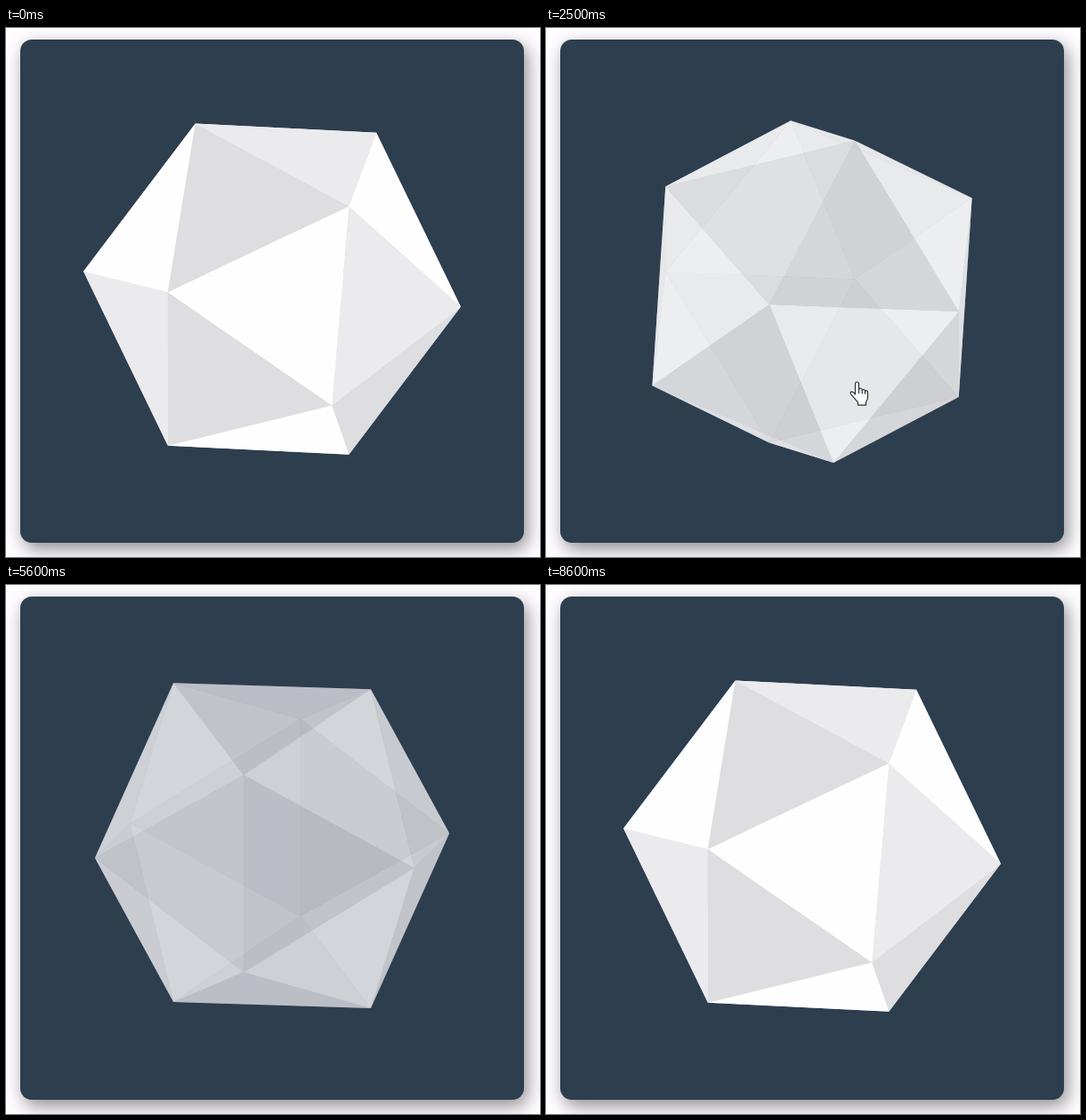
An HTML page with a canvas for the animation above (9.1 s loop, 600 px wide and 595 px high).

```html
<!DOCTYPE html>
<html lang="en">
<head>
<meta charset="utf-8">
<title>Icosahedron</title>
<style>
  html, body { margin: 0; width: 100%; height: 100%; overflow: hidden; background: #fffdff; }
  .card {
    position: absolute; left: 16px; top: 13px; width: 566px; height: 565.5px;
    border-radius: 13px; background: #2d3e4f;
    box-shadow: 4px 7px 20px rgba(0, 0, 0, .45);
  }
  canvas { position: absolute; left: 0; top: 0; }
</style>
</head>
<body>
<div class="card"></div>
<canvas id="stage" width="600" height="595"></canvas>
<script>
const ctx = document.getElementById('stage').getContext('2d');
const LOOP = 9100, STEP = 100, TURN = 3000, ENTER = 880, LEAVE = 4995;
const PHI = (1 + Math.sqrt(5)) / 2, UNIT = 112.6;
const WHITE = '#fffeff', LIGHT = '#ebeaec', DARK = '#dedddf';

// Puts a point into the frame whose first axis is k (cyclic order).
const place = (k, p) => [0, 1, 2].map(i => p[(i - k + 3) % 3]);

const faces = [];
for (const a of [-1, 1]) for (const b of [-1, 1]) {
  for (const c of [-1, 1]) {
    faces.push({ color: WHITE, points: [[0, a, b * PHI], [c, a * PHI, 0], [c * PHI, 0, b]] });
  }
  // Two faces meet at each short edge, one on each side of it.
  for (let k = 0; k < 3; k++) {
    faces.push({
      color: b > 0 ? DARK : LIGHT,
      points: [[a * PHI, 0, 1], [a * PHI, 0, -1], [a, b * PHI, 0]].map(p => place(k, p))
    });
  }
}

// cubic-bezier(.42, 0, .58, 1)
function easeInOut(x) {
  if (x <= 0) return 0;
  if (x >= 1) return 1;
  let lo = 0, hi = 1;
  for (let i = 0; i < 24; i++) {
    const s = (lo + hi) / 2, r = 1 - s;
    if (1.26 * r * r * s + 1.74 * r * s * s + s * s * s < x) lo = s; else hi = s;
  }
  return lo * lo * (3 - 2 * lo);
}

function drawSolid(p) {
  const angle = -(40 + 360 * p) * Math.PI / 180;
  const s = Math.sin(angle), c = Math.cos(angle);
  const project = ([x, y, z]) => {
    const depth = c * z - s * x;
    return [
      299 + UNIT * (c * x + s * z),
      295.6 - 2.5 * c + UNIT * (c * y - s * depth),
      s * y + c * depth
    ];
  };
  const depthOf = points => points[0][2] + points[1][2] + points[2][2];

  ctx.globalAlpha = 1 - p / 2;
  faces
    .map(f => ({ color: f.color, points: f.points.map(project) }))
    .sort((f, g) => depthOf(f.points) - depthOf(g.points))
    .forEach(({ color, points }) => {
      ctx.beginPath();
      points.forEach(([x, y]) => ctx.lineTo(x, y));
      ctx.fillStyle = color;
      ctx.fill();
    });
  ctx.globalAlpha = 1;
}

const hand = new Path2D('M-2 2a2 2 0 0 1 4 0v6q3-1.5 3.7 1q2.7-1 3.3 1q2.6-.6 3 1.6v6q0 3-2 5v3.6h-9v-3l-5-6q-4-4-3.4-5.4q2-2 5.4 2.2z');
const knuckles = new Path2D('M2 8v5M5.7 9v4.4M9 10v3.8');
const arrow = new Path2D('M0 0v16l3.7-3.5l2.5 6l2.6-1.1l-2.5-5.8h5.2z');

// Pointer stops: time, x, y
const path = [
  [500, 574, 492], [700, 525, 470], [900, 430, 428], [1100, 375, 406], [1400, 352, 398],
  [2000, 351.5, 398], [2500, 349.5, 398], [4000, 348.5, 398], [4700, 350, 398],
  [4900, 395, 415], [5000, 450, 440], [5200, 578, 474]
];

function drawPointer(t) {
  const i = path.findIndex(stop => stop[0] > t);
  if (i < 1) return;
  const [t0, x0, y0] = path[i - 1], [t1, x1, y1] = path[i];
  const k = (t - t0) / (t1 - t0);
  const over = t >= ENTER && t < LEAVE;
  ctx.save();
  ctx.translate(x0 + (x1 - x0) * k, y0 + (y1 - y0) * k);
  ctx.fillStyle = '#fff';
  ctx.strokeStyle = '#26303a';
  ctx.lineWidth = 1.2;
  ctx.lineJoin = 'round';
  ctx.fill(over ? hand : arrow);
  ctx.stroke(over ? hand : arrow);
  if (over) ctx.stroke(knuckles);
  ctx.restore();
}

function draw(now) {
  const t = Math.floor(now % LOOP / STEP) * STEP;
  ctx.clearRect(0, 0, 600, 595);
  drawSolid(easeInOut((t - ENTER) / TURN) - easeInOut((t - LEAVE) / TURN));
  drawPointer(t);
  requestAnimationFrame(draw);
}

const start = performance.now();
const tick = draw;
draw = now => tick(Math.max(0, now - start));
requestAnimationFrame(draw);
</script>
</body>
</html>
```
